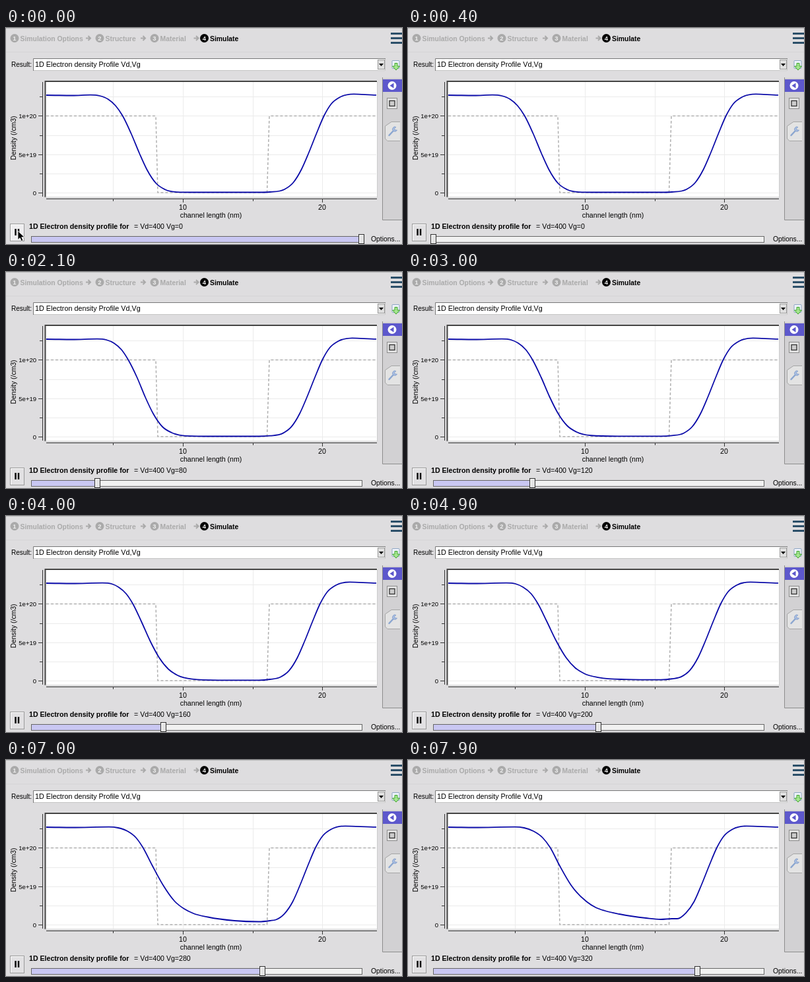
Recreate the animation shown at these times as an HTML page. Size 600 px wide and 328 px high, loop 8 s.

```html
<!DOCTYPE html>
<html>
<head>
<meta charset="utf-8">
<style>
html, body { margin: 0; width: 100%; height: 100%; overflow: hidden; background: #dedddf; }
svg { display: block; font-family: "Liberation Sans", Arial, sans-serif; }
.b { font-weight: bold; }
</style>
</head>
<body>
<svg id="stage" width="600" height="328" viewBox="0 0 600 328">
  <rect width="600" height="328" fill="#dedddf"/>
  <path d="M0 .5H600" stroke="#c0c0c0"/>
  <path d="M0 36.5H600" stroke="#d5d4d6"/>
  <g id="steps" class="b" font-size="10.4"></g>
  <path d="M583 8.5H600M583 15.5H600M583 22.5H600" stroke="#2b4f69" stroke-width="3"/>

  <text x="8" y="59" font-size="10">Result:</text>
  <rect x="41" y="46.5" width="534" height="18" fill="#fff"/>
  <path d="M41.5 65V46.5H575" fill="none" stroke="#777"/>
  <path d="M42 64.5H574.5V47" fill="none" stroke="#c4c4c4"/>
  <text x="44" y="59" font-size="10.8">1D Electron density Profile Vd,Vg</text>
  <rect x="563.5" y="48.5" width="10" height="14" fill="#e0e0e0" stroke="#999"/>
  <path d="M565 54H572L568.5 58Z"/>
  <rect x="585" y="49.5" width="11" height="12" rx="1" fill="#eef3fa" stroke="#8fa6c4"/>
  <path d="M589 53.5H593V58H596.5L591 64L585.5 58H589Z" fill="#a5e58f" stroke="#3fa52c"/>

  <rect x="59" y="80" width="504" height="177" fill="#fff"/>
  <path id="grid" stroke="#ebebeb" fill="none"/>
  <path d="M61 133.5H227L230 250H395.5L399 133.5H561" fill="none" stroke="#b0b0b0" stroke-width="1.5" stroke-dasharray="4 3"/>
  <path id="curve" fill="none" stroke="#0b0ba8" stroke-width="1.8" stroke-linejoin="round"/>
  <path d="M59.5 257V81H562" fill="none" stroke="#444" stroke-width="2"/>
  <path d="M59 257H562.5V81" fill="none" stroke="#ccc"/>
  <path id="ticks" fill="none" stroke="#333"/>
  <g font-size="9.5" text-anchor="end">
    <text x="46" y="137">1e+20</text>
    <text x="46" y="195.5">5e+19</text>
    <text x="46" y="254">0</text>
  </g>
  <g font-size="10.6" text-anchor="middle">
    <text x="268" y="276">10</text>
    <text x="479" y="276">20</text>
    <text x="310.5" y="288">channel length (nm)</text>
    <text transform="translate(15 167) rotate(-90)" font-size="10.4">Density (/cm3)</text>
  </g>

  <rect x="571" y="76" width="29" height="215" fill="#d2d1d3"/>
  <path d="M570.5 75V291.5H600" fill="none" stroke="#8d8d8d"/>
  <rect x="571" y="78" width="29" height="19" fill="#5d58cc"/>
  <circle cx="585" cy="87.5" r="6.5" fill="#fff"/>
  <path d="M587.5 83.5V91.5L581.5 87.5Z" fill="#5d58cc"/>
  <rect x="577.5" y="106.5" width="15" height="16" fill="#e3e3e3" stroke="#8c8c8c"/>
  <rect x="581" y="110.5" width="8" height="8" fill="#ccc" stroke="#333" stroke-width="1.3"/>
  <path d="M597 142.5H584L574.5 149V168L578 171.5H597" fill="#e3e3e3" stroke="#a5a5a5"/>
  <path d="M580.5 163L587 156" stroke="#8ba6d0" stroke-width="2.4" stroke-linecap="round"/>
  <path d="M591 150.5A3.6 3.6 0 1 0 592.5 155L589.5 155L588.5 152.5Z" fill="#a9bfe2" stroke="#7f9bc8" stroke-width=".8"/>

  <rect id="button" x="6.5" y="297.5" width="21" height="26" stroke="#9a9a9a"/>
  <path d="M7.5 323V298.5H27" fill="none" stroke="#fff"/>
  <path d="M14.5 305V315M19 305V315" stroke="#000" stroke-width="2.4"/>
  <text class="b" x="35" y="304.5" font-size="10.6">1D Electron density profile for</text>
  <text id="bias" x="194" y="304.5" font-size="10.6"></text>
  <rect x="38.5" y="316.5" width="501" height="9" fill="#f1f1f1" stroke="#666"/>
  <rect id="fill" x="39" y="317" width="0" height="8" fill="#c9c7f2"/>
  <g id="handle">
    <rect x="-4" y="313.5" width="8" height="14" fill="#e2e2e2" stroke="#333"/>
    <path d="M-2.5 326V315H3" fill="none" stroke="#fff"/>
  </g>
  <text x="553" y="324" font-size="10.4">Options...</text>
  <path id="cursor" d="M0 0V13.5L3.2 10.7L5.3 15.5L7.8 14.4L5.7 9.7H10Z" fill="#000" stroke="#fff" stroke-width=".8"/>
</svg>
<script>
const $ = id => document.getElementById(id);

const steps = [[13, "Simulation Options", 125], [142, "Structure", 208], [225, "Material", 288.5], [300.5, "Simulate"]];
$("steps").innerHTML = steps.map(([x, name, next], i) => {
  const on = i === 3, ink = on ? "#000" : "#aaa";
  const arrow = on ? "" : `<path d="M${next - 4} 15.5h7m-3.5 -3.5l3.5 3.5l-3.5 3.5" fill="none" stroke="#aaa" stroke-width="2"/>`;
  return `<circle cx="${x}" cy="15.5" r="6.5" fill="${ink}"/>
    <text x="${x}" y="19" fill="#eee" font-size="9.5" text-anchor="middle">${i + 1}</text>
    <text x="${x + 8.5}" y="19.5" fill="${ink}">${name}</text>${arrow}`;
}).join("");

const rows = [104.5, 133.5, 163.5, 192.5, 221.5, 250.5];
const cols = [162.5, 268.5, 374.5, 479.5];
$("grid").setAttribute("d",
  rows.map(y => `M61 ${y}H561`).join("") + cols.map(x => `M${x} 82V256`).join(""));
$("ticks").setAttribute("d", "M55.5 82V256M61 259.5H562" +
  rows.map((y, i) => `M55 ${y}h${i % 2 ? -6 : -4}`).join("") +
  cols.map((x, i) => `M${x} 259v${i % 2 ? 6 : 4}`).join(""));

// Left flank: x where the curve meets each level; tail: y at fixed distances after it;
// floor: y at 383 and 400; shift: how far the right flank moves left.
const leftLevels = [103, 108, 118, 133, 160, 190, 215];
const tailSteps = [14, 28, 50, 90];
const rightFlank = [[422, 245], [435, 235], [447.5, 215], [458.5, 190], [470.5, 160], [482, 133], [493, 115], [506, 105], [527, 100.3]];
const shapes = {
  0:   { left: [142, 154.5, 166, 176.5, 189.5, 202, 213.5], tail: [236, 245.5, 249.3, 249.5], floor: [249.5, 249], shift: 0 },
  80:  { left: [152, 163.5, 175, 185, 198.5, 211, 223], tail: [235, 244, 248.8, 249.5], floor: [249.5, 248.7], shift: 2.5 },
  160: { left: [160, 170.5, 182, 192, 205, 218.5, 232], tail: [232.5, 242, 247.7, 249.3], floor: [249.3, 248], shift: 6 },
  240: { left: [166, 178, 191, 201.5, 215.5, 231, 247], tail: [229, 237, 243, 247], floor: [248, 246.5], shift: 10 },
  280: { left: [170, 184, 197, 207.5, 221.5, 238, 256], tail: [226, 233, 238.5, 244], floor: [245.5, 244], shift: 13 },
  320: { left: [176, 190, 204, 215.5, 229.5, 247, 270.5], tail: [224, 229, 234, 240], floor: [242, 241], shift: 14 }
};
const mean = (a, b) => a.map((v, i) => (v + b[i]) / 2);

function shapeAt(vg) {
  if (shapes[vg]) return shapes[vg];
  const a = shapes[vg - 40], b = shapes[vg + 40];
  return {
    left: mean(a.left, b.left), tail: mean(a.tail, b.tail),
    floor: mean(a.floor, b.floor), shift: (a.shift + b.shift) / 2
  };
}

function curvePath(vg) {
  const s = shapeAt(vg), foot = s.left[6];
  // Charge left in the channel lifts the start of the right flank.
  const lift = y => Math.min(y, y - (y - 215) / 30 * (249 - s.floor[1]) * .5);
  const pts = [
    [61, 102], [100, 102.5], [s.left[0] - 14, 101.6],
    ...s.left.map((x, i) => [x, leftLevels[i]]),
    ...s.tail.map((y, i) => [foot + tailSteps[i], y]),
    [383, s.floor[0]], [400, s.floor[1]],
    ...rightFlank.map(([x, y]) => [x - s.shift, lift(y)]),
    [561, 101.8]
  ];
  const last = pts.length - 1;
  const grade = i => (pts[i + 1][1] - pts[i][1]) / (pts[i + 1][0] - pts[i][0]);
  const slope = i => {
    if (i === 0 || i === last) return 0;
    const a = grade(i - 1), b = grade(i);
    if (a * b <= 0) return 0;
    const h = pts[i][0] - pts[i - 1][0], k = pts[i + 1][0] - pts[i][0];
    const m = (a * k + b * h) / (h + k);
    return Math.sign(m) * Math.min(Math.abs(m), 3 * Math.abs(a), 3 * Math.abs(b));
  };
  let d = `M${pts[0]}`;
  for (let i = 0; i < last; i++) {
    const [x, y] = pts[i], [u, v] = pts[i + 1], t = (u - x) / 3;
    d += `C${[x + t, y + t * slope(i), u - t, v - t * slope(i + 1), u, v]}`;
  }
  return d;
}

const LOOP = 8000;
const changes = [0, 1000, 1800, 2800, 3900, 4700, 5700, 6600, 7500];
const paths = changes.map((_, i) => curvePath(i * 40));
const stepAt = t => changes.filter(c => c <= t).length - 1;
let shown = -1;

function draw(now) {
  const t = now % LOOP, step = stepAt(t);
  if (step !== shown) {
    shown = step;
    $("curve").setAttribute("d", paths[step]);
    $("bias").textContent = `= Vd=400 Vg=${step * 40}`;
  }
  // The slider follows the plot a moment later.
  const pos = t < 100 ? 10 : stepAt(t - 100);
  $("fill").setAttribute("width", pos * 50);
  $("handle").setAttribute("transform", `translate(${38.5 + pos * 50} 0)`);
  const away = Math.max(0, t - 100) / 200;
  $("cursor").setAttribute("transform", `translate(${18 + away * 4} ${308 + away * 22})`);
  $("cursor").setAttribute("visibility", away < 1 ? "visible" : "hidden");
  $("button").setAttribute("fill", away < 1 ? "#efeef0" : "#e2e1e3");
}

const start = performance.now();
function tick() {
  draw(performance.now() - start);
  requestAnimationFrame(tick);
}
tick();
</script>
</body>
</html>
```
